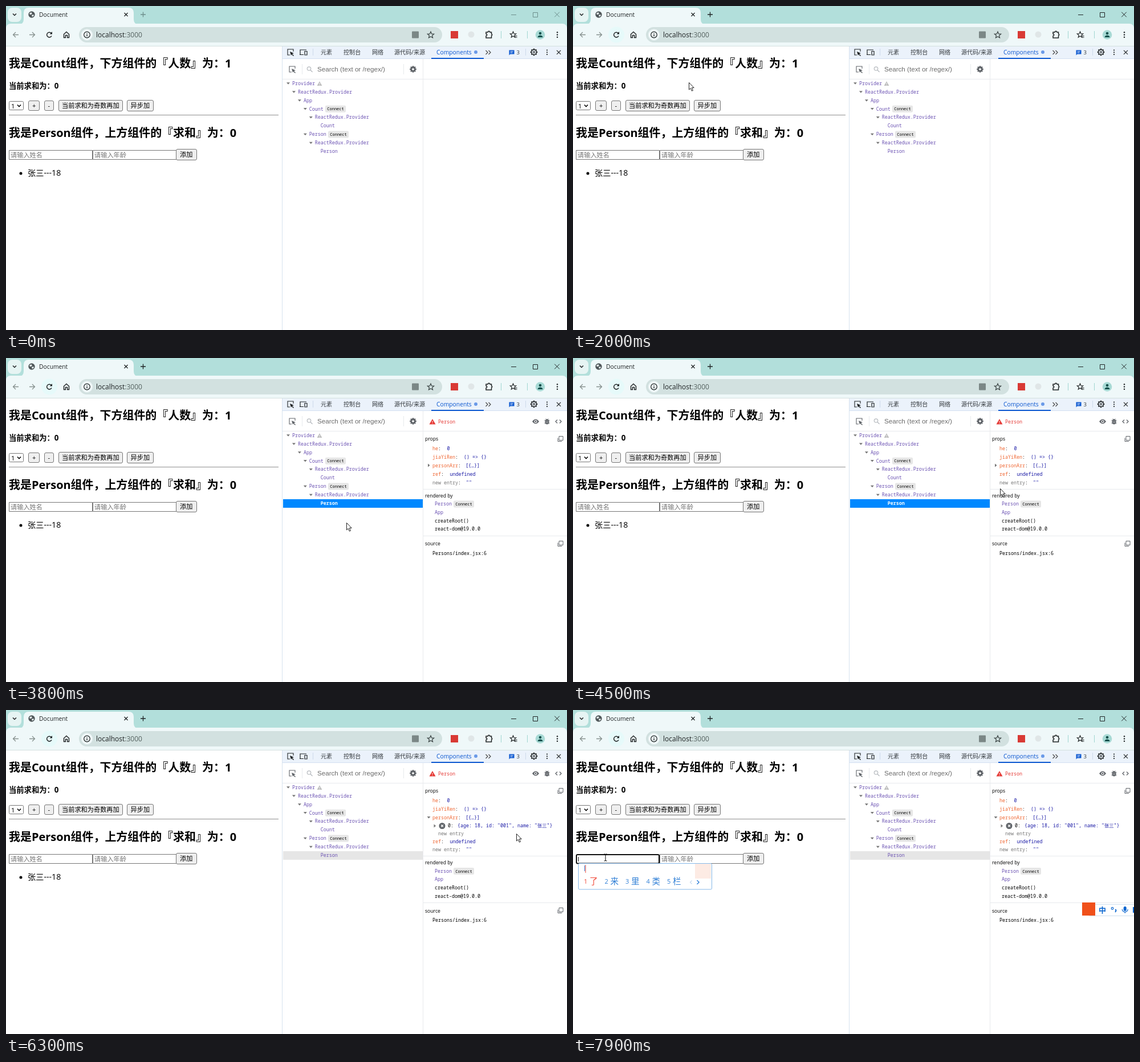
Animation, 984 px wide and 569 px high, one loop 8 s. Source, as an HTML page with a canvas:

```html
<!DOCTYPE html>
<html lang="zh">
<head>
<meta charset="utf-8">
<title>Document</title>
<style>
html, body { margin: 0; width: 100%; height: 100%; overflow: hidden; background: #fff; }
canvas { display: block; width: 984px; height: 569px; }
</style>
</head>
<body>
<canvas id="stage" width="984" height="569"></canvas>
<script>
const g = document.getElementById('stage').getContext('2d');
const LOOP = 8000;
const SANS = '"Open Sans", "Noto Sans CJK SC", "Noto Sans CJK", sans-serif';
const ARIAL = '"Liberation Sans", sans-serif';
const MONO = '"Noto Sans Mono", "Noto Sans CJK SC", "Noto Sans CJK", monospace';
const INK = '#1f2324', GREY = '#5f6368', PURPLE = '#6a51b2', BLUE = '#0b57d0';
const ORANGE = '#ef6632', VALUE = '#1a1aa6', RULE = '#e8eaed';

// y is the optical middle of the line
function text(s, x, y, size, color = '#000', font = SANS, weight = 400) {
  g.font = `${weight} ${size}px ${font}`;
  g.fillStyle = color;
  g.fillText(s, x, Math.round(y + size * 0.36));
}
const mono = (s, x, y, color, weight = 500) => text(s, x, y, 8.33, color, MONO, weight);

function rect(x, y, w, h, color) {
  g.fillStyle = color;
  g.fillRect(x, y, w, h);
}
function box(x, y, w, h, r, fill, stroke, lw = 1) {
  g.beginPath();
  g.roundRect(x, y, w, h, r);
  if (fill) { g.fillStyle = fill; g.fill(); }
  if (stroke) { g.strokeStyle = stroke; g.lineWidth = lw; g.stroke(); }
}
function disc(x, y, r, fill, stroke, lw = 1) {
  box(x - r, y - r, 2 * r, 2 * r, r, fill, stroke, lw);
}
function path(d, x, y, stroke, lw = 1.3, fill) {
  const p = new Path2D(d);
  g.save();
  g.translate(x, y);
  if (fill) { g.fillStyle = fill; g.fill(p); }
  if (stroke) { g.strokeStyle = stroke; g.lineWidth = lw; g.stroke(p); }
  g.restore();
}
const cross = (x, y, r, color, lw) =>
  path(`M${-r} ${-r}L${r} ${r}M${r} ${-r}L${-r} ${r}`, x, y, color, lw);
function dots(x, y, r, gap) {
  for (let i = -1; i < 2; i++) disc(x, y + i * gap, r, INK);
}
function star(x, y, r, color) {
  let d = '';
  for (let i = 0; i < 10; i++) {
    const a = i * Math.PI / 5, q = i % 2 ? r * 0.45 : r;
    d += (i ? 'L' : 'M') + q * Math.sin(a) + ' ' + -q * Math.cos(a);
  }
  path(d + 'Z', x, y, color, 1.2);
}
function gear(x, y, r, color, solid) {
  g.save();
  g.translate(x, y);
  for (let i = 0; i < 8; i++) {
    g.rotate(Math.PI / 4);
    rect(-r * 0.2, -r, r * 0.4, r * 0.4, color);
  }
  g.restore();
  if (solid) disc(x, y, r * 0.57, null, color, r * 0.5);
  else {
    disc(x, y, r * 0.72, null, color, 1.2);
    disc(x, y, r * 0.25, null, color, 1.1);
  }
}
function inspectIcon(x, y, color) {
  path('M5 -1V-5H-5V5H-1', x, y, color, 1.1);
  path('M-1 -1L6 2L3 3L6 6L5 7L2 4L1 6Z', x, y, null, 1, color);
}
const caret = (x, y, open = true) =>
  path(open ? 'M-3 -1.5H3L0 2Z' : 'M-1.5 -3V3L2 0Z', x, y, null, 1, '#777');
function warn(x, y, r, color) {
  path(`M0 ${-r}L${r * 1.1} ${r * 0.9}H${-r * 1.1}Z`, x, y, null, 1, color);
  rect(x - 0.5, y - r * 0.3, 1, r * 0.55, '#fff');
  rect(x - 0.5, y + r * 0.48, 1, 1, '#fff');
}
function badge(x, y) {
  box(x, y - 5.7, 36, 12, 2, '#e6e6e6');
  text('Connect', x + 3.3, y + 0.3, 7, '#000', MONO, 500);
}

function tabStrip(active) {
  const ctl = active ? INK : '#6d8f8c';
  rect(0, 0, 984, 40, '#b2dfdb');
  box(3, 3, 24, 25, 8, '#e6f4f3');
  path('M-3 -1.5L0 1.5L3 -1.5', 15, 15, INK, 1.5);
  path('M23 32Q31 32 31 23V12Q31 3 40 3H215Q224 3 224 12V23Q224 32 232 32Z', 0, 0, null, 1, '#eff8f9');
  disc(45, 15, 5.7, '#50575a');
  path('M-4 -2L-1 -4L1 -2L-1 0L-3 0ZM0 1L3 0L4 2L1 4Z', 45, 15, null, 1, '#e6efef');
  text('Document', 58, 15.3, 10.3, INK);
  cross(210.5, 15, 3, INK, 1.3);
  path('M-4.5 0H4.5M0 -4.5V4.5', 240.5, 15, ctl, 1.3);
  path('M886 15.5H895', 0, 0, ctl, 1);
  box(924.5, 11.5, 8, 8, 0, null, ctl);
  cross(966.5, 15, 4.3, ctl, 1);
}

function toolbar(hover) {
  box(0, 31, 984, 40, [8, 8, 0, 0], '#eff8f9');
  rect(0, 70, 984, 1, '#d3e0df');
  path('M5 0H-4.5M0 -4.5L-4.5 0L0 4.5', 17, 50.5, '#87918f', 1.3);
  path('M-5 0H4.5M0 -4.5L4.5 0L0 4.5', 46, 50.5, '#87918f', 1.3);
  if (hover) disc(76, 50.5, 14, hover);
  path('M4 2A4.4 4.4 0 1 1 3.4 -2.8', 76, 50.5, INK, 1.5);
  path('M5 -5.5V-1H0.7Z', 76, 50.5, null, 1, INK);
  path('M-4.5 5V-1L0 -5L4.5 -1V5H1.6V1H-1.6V5Z', 106, 50.5, INK, 1.4);

  box(128, 37, 637, 27, 13.5, '#d2e1e0');
  disc(142, 50.5, 10, '#eff8f9');
  disc(142, 50.5, 5.3, null, INK, 1.2);
  rect(141.4, 49.7, 1.3, 3.7, INK);
  rect(141.4, 47.3, 1.3, 1.3, INK);
  text('localhost', 158, 50.5, 12, INK);
  text(':3000', 158 + g.measureText('localhost').width, 50.5, 12, '#566361');
  box(712, 44.5, 12, 12, 1, '#7b8786');
  star(745, 51, 6, '#3c4545');
  rect(780, 44, 13, 13, '#d93a35');
  disc(816, 50, 5.5, '#e0e6e7');
  path('M-5 -4H-1.7A1.7 1.7 0 0 1 1.7 -4H4.5V-1A1.7 1.7 0 0 1 4.5 2.2V6H-5V2.4A1.7 1.7 0 0 0 -5 -1Z', 847, 50, INK, 1.5);
  rect(868, 44, 1, 13, '#9fd6d1');
  star(889.5, 50.5, 5.5, INK);
  path('M3 2H7M3 4.5H7', 889.5, 50.5, INK, 1.2);
  rect(914, 44, 1, 13, '#9fd6d1');
  disc(937, 50.5, 8.3, '#a8dad5');
  disc(937, 48, 2.3, '#12504c');
  path('M-4.5 4.5Q-4 1 0 1Q4 1 4.5 4.5Z', 937, 50.5, null, 1, '#12504c');
  dots(967, 50.5, 1.2, 4.3);
}

function button(s, x, y, w, h, tx) {
  box(x + 0.5, y + 0.5, w - 1, h - 1, 2.5, '#efefef', '#767676');
  text(s, tx, y + h / 2 + 0.2, 11.2);
}
function page(focus, typed, caretOn) {
  text('我是Count组件，下方组件的『人数』为：1', 5, 101, 19.95, '#000', SANS, 700);
  text('当前求和为：0', 5, 140, 13.3, '#000', SANS, 700);
  box(5.5, 167.5, 25, 15, 2, '#fff', '#767676');
  text('1', 9, 175.5, 11.2);
  path('M-3 -1.5L0 1.7L3 -1.5', 23, 175, '#000', 1.6);
  button('+', 39, 166, 20, 18, 46);
  button('-', 67, 166, 17, 18, 73.5);
  button('当前求和为奇数再加', 92, 165, 113, 20, 98);
  button('异步加', 212, 165, 47, 20, 218.5);
  rect(5, 191, 473, 1, '#8f8f8f');
  text('我是Person组件，上方组件的『求和』为：0', 5, 223, 19.95, '#000', SANS, 700);
  box(152.5, 253.5, 146, 16, 0, '#fff', '#767676');
  text('请输入年龄', 155, 262, 11.2, '#757575');
  if (focus) box(6, 254, 145, 15.5, 2, '#fff', '#101010', 2);
  else box(5.5, 253.5, 146, 16, 0, '#fff', '#767676');
  if (!typed) text('请输入姓名', 8, 262, 11.2, '#757575');
  else text('l', 8, 261.5, 11.2);
  if (caretOn) rect(8, 255, 1, 13, '#000');
  button('添加', 298, 251, 37, 20, 305);
  disc(26, 294, 2.5, '#000');
  text('张三---18', 38, 293, 14.2);
}

function devtoolsBar(loading) {
  rect(485, 71, 499, 22, '#ebf2fb');
  rect(485, 92, 499, 1, '#d3e0f2');
  rect(484, 71, 1, 498, '#d6e2ee');
  inspectIcon(499, 81, INK);
  path('M-6 4V-4H5M-7 4.5H0M2 -1.5H6V5H2Z', 522, 81, INK, 1.2);
  rect(538, 75, 1, 12, '#cddaea');
  const tabs = [['元素', 552], ['控制台', 592], ['网络', 642], ['源代码/来源', 681]];
  if (loading) tabs.push(['性能', 755]);
  for (const [s, x] of tabs) text(s, x, 81.3, 10.1, '#33383c');
  const x = loading ? 795 : 755;
  text('Components', x, 81.3, 10.3, BLUE);
  disc(x + 69, 81, 3, '#6b9ae8');
  rect(x - 9, 91, 92, 2, BLUE);
  path('M-4.5 -3.5L-1 0L-4.5 3.5M0.5 -3.5L4 0L0.5 3.5', x + 91, 81.5, '#444', 1.1);
  if (!loading) {
    path('M-4.5 -4H4.5V3H-2.5L-4.5 5Z', 887, 81.5, null, 1, BLUE);
    path('M-2.5 -1.7H2.5M-2.5 0.6H1.5', 887, 81.5, '#fff', 0.9);
    text('3', 895.5, 81.8, 9.5, '#33383c');
  }
  rect(911, 75, 1, 12, '#cddaea');
  gear(926, 81, 6.2, INK);
  dots(949, 81.3, 1.1, 3.8);
  cross(969.5, 81.3, 3.5, INK, 1.2);
}

const TREE = [
  ['Provider', 0], ['ReactRedux.Provider', 1], ['App', 2],
  ['Count', 3, 560], ['ReactRedux.Provider', 4], ['Count', 5],
  ['Person', 3, 565], ['ReactRedux.Provider', 4], ['Person', 5]
];
const rowY = i => 135.8 + i * 14.92;

function tree(hoverRow, picked, blurred) {
  rect(485, 128, 499, 1, RULE);
  rect(731, 93, 1, 476, RULE);
  inspectIcon(502, 111, GREY);
  rect(519, 102, 1, 18, RULE);
  disc(531.5, 110, 3.2, null, '#b5b9be', 1.2);
  path('M2.5 2.5L6 6', 531.5, 110, '#b5b9be', 1.3);
  text('Search (text or /regex/)', 546, 111, 11.64, '#6b6b6b', ARIAL);
  rect(697, 102, 1, 18, RULE);
  gear(714, 111, 5.8, GREY, true);

  TREE.forEach(([name, depth, tag], i) => {
    const y = rowY(i), x = 502 + depth * 9.95, on = picked && i === 8;
    const top = Math.round(y - 7.3);
    if (on) rect(486, top, 245, 15, blurred ? '#e6e6e6' : '#0088ff');
    else if (i === hoverRow) rect(486, top, 245, 15, '#ebf1fb');
    if (depth < 5) caret(x - 7, y);
    const lit = on && !blurred;
    mono(name, x, y, lit ? '#fff' : PURPLE, lit ? 700 : 500);
    if (tag) badge(tag, y);
  });
  warn(550, 136.3, 4, '#bdbdbd');
}

function copyIcon(y) {
  box(970, y - 4.5, 7, 7, 0, null, GREY);
  path('M-4 -1.5V4.5H3', 972, y, GREY, 1);
}
function prop(name, y, value, vx, color = ORANGE) {
  mono(name, 748, y, color);
  mono(':', 748 + name.length * 5, y, '#333');
  mono(value, vx, y, VALUE);
}
function inspector(open) {
  warn(748, 112, 5, '#e53935');
  mono('Person', 758, 112, '#e53935');
  path('M-6 0Q0 -8 6 0Q0 8 -6 0Z', 929, 111.5, null, 1, GREY);
  disc(929, 111.5, 2.5, '#fff');
  disc(929, 111.5, 1.4, GREY);
  path('M-4.5 -2H4.5M-4.5 0.7H4.5M-4.5 3.4H4.5M-2.2 -5L-1 -3.5M2.2 -5L1 -3.5', 949, 111.5, GREY, 1);
  box(946, 107.5, 6, 9, 3, GREY);
  path('M948 111H950M948 113.5H950', 0, 0, '#fff', 0.8);
  path('M-2 -3L-5 0L-2 3M2 -3L5 0L2 3', 969, 111.5, GREY, 1.3);

  const dy = open ? 26.5 : 0, ruleShift = open ? 26 : 0;
  text('props', 735, 142, 8.6);
  copyIcon(142);
  prop('he', 159.5, '0', 773.5);
  prop('jiaYiRen', 174, '() => {}', 803);
  prop('personArr', 189, '[{…}]', 806);
  caret(741.5, 188.5, open);
  if (open) {
    caret(752, 203.5, false);
    disc(765, 203.5, 5.5, GREY);
    cross(765, 203.5, 2, '#fff', 1.2);
    mono('0', 775, 203.5, '#000');
    mono(':', 780, 203.5, '#333');
    mono('{age: 18, id: "001", name: "张三"}', 792, 203.5, VALUE);
    mono('new entry', 758, 217.5, '#777');
  }
  prop('ref', 204.3 + dy, 'undefined', 778.5);
  prop('new entry', 219 + dy, '""', 807, '#777');
  rect(732, 230 + ruleShift, 252, 1, RULE);
  text('rendered by', 735, 241.5 + dy, 8.6);
  mono('Person', 752, 256.3 + dy, PURPLE);
  badge(785, 256.3 + dy);
  mono('App', 752, 271 + dy, PURPLE);
  mono('createRoot()', 752, 285.7 + dy, '#000');
  mono('react-dom@19.0.0', 752, 300.5 + dy, '#000');
  rect(732, 312 + ruleShift, 252, 1, RULE);
  text('source', 735, 326 + dy, 8.6);
  copyIcon(326 + ruleShift);
  mono('Persons/index.jsx:6', 748, 343 + dy, '#000');
}

function imeBar() {
  box(904, 341.5, 90, 20, 3, '#fff', '#cfdfee');
  rect(893, 338, 23, 23, '#f0501a');
  text('中', 922, 351, 13, '#0a66d0', SANS, 700);
  disc(946, 348.5, 1.8, null, '#0a66d0', 1.2);
  path('M0 -1.5Q3 -1 0 3', 951, 352, '#0a66d0', 1.8);
  box(965.7, 345, 5, 8, 2.5, '#0a66d0');
  path('M-5 0Q-4.5 4.5 0 4.5Q4.5 4.5 5 0M0 4.5V7', 968.2, 350, '#0a66d0', 1.2);
  rect(982, 346, 2, 10, '#0a66d0');
}
function imePopup() {
  box(9.5, 269.5, 234, 45.5, 2, '#fff', '#86b8e8');
  rect(214, 270, 28, 26, '#fdebe4');
  text('l', 19, 279, 12, '#2f7fd6');
  rect(21.5, 272, 1, 14, '#f04a3a');
  [...'了来里类栏'].forEach((c, i) => {
    const x = 19 + i * 36.5, color = i ? '#2f7fd6' : '#f04a3a';
    text(i + 1, x, 301.5, 11, color);
    text(c, x + 10, 301, 14.5, color);
  });
  path('M1.5 -3L-1.5 0L1.5 3', 207, 302.5, '#c5d9ee', 1.2);
  path('M-1.5 -3.5L2 0L-1.5 3.5', 219, 302.5, '#2f7fd6', 1.4);
}

// pointer way-points: time, x, y
const WAY = [
  [300, 330, 46], [500, 170, 56], [700, 88, 60], [900, 79, 60], [1600, 79, 60],
  [1800, 150, 116], [2000, 203, 134], [2500, 203, 134], [2700, 240, 152], [2900, 438, 244],
  [3000, 474, 266], [3100, 522, 300], [3300, 532, 270], [3400, 552, 254], [3700, 560, 253],
  [3800, 597, 289], [3900, 619, 296], [4000, 662, 298], [4100, 683, 291],
  [4200, 730, 250], [4300, 749, 229], [4500, 749, 229], [4900, 741, 189], [5200, 741, 189],
  [5500, 782, 197], [5700, 856, 208], [6000, 893, 212], [6200, 893, 212], [6300, 895, 217],
  [6500, 495, 382], [6700, 200, 300], [6800, 110, 264], [7000, 57, 259]
];
function pointerAt(t) {
  if (t < WAY[0][0]) return null;
  const i = WAY.findIndex(p => p[0] > t);
  if (i < 0) return WAY[WAY.length - 1].slice(1);
  const [t0, x0, y0] = WAY[i - 1], [t1, x1, y1] = WAY[i];
  const k = (t - t0) / (t1 - t0);
  return [x0 + (x1 - x0) * k, y0 + (y1 - y0) * k];
}
function pointer(x, y) {
  const inInput = x > 5 && x < 298 && y > 253 && y < 270;
  if (inInput) path('M-2.5 -6H-0.7L0 -5L0.7 -6H2.5M0 -5V5M-2.5 6H-0.7L0 5L0.7 6H2.5', x, y, '#000', 1);
  else path('M0.5 0.5V13L3.3 10.4L5.3 15.2L7.4 14.3L5.4 9.6H9.2Z', x, y, '#222', 1, '#fff');
}

function draw(t) {
  const loading = t >= 1000 && t < 1700;
  const at = pointerAt(t);
  rect(0, 0, 984, 569, '#fff');
  tabStrip(t >= 100);
  toolbar(t < 700 ? null : t < 1700 ? '#d2e1e0' : '#e6fafa');
  page(t >= 7000, t >= 7900, t >= 7000 && t < 7500);
  devtoolsBar(loading);
  if (!loading) {
    const hover = at && at[0] > 486 && at[0] < 731 ? Math.round((at[1] - rowY(0)) / 14.92) : -1;
    tree(hover, t >= 3600, t >= 5100);
    if (t >= 3600) inspector(t >= 5100);
  }
  if (t >= 7000) imeBar();
  if (t >= 7900) imePopup();
  if (at) pointer(...at);
}

const start = performance.now();
function tick() {
  const t = (performance.now() - start) % LOOP;
  draw(Math.floor(t / 100) * 100);
  requestAnimationFrame(tick);
}
tick();
</script>
</body>
</html>
```
